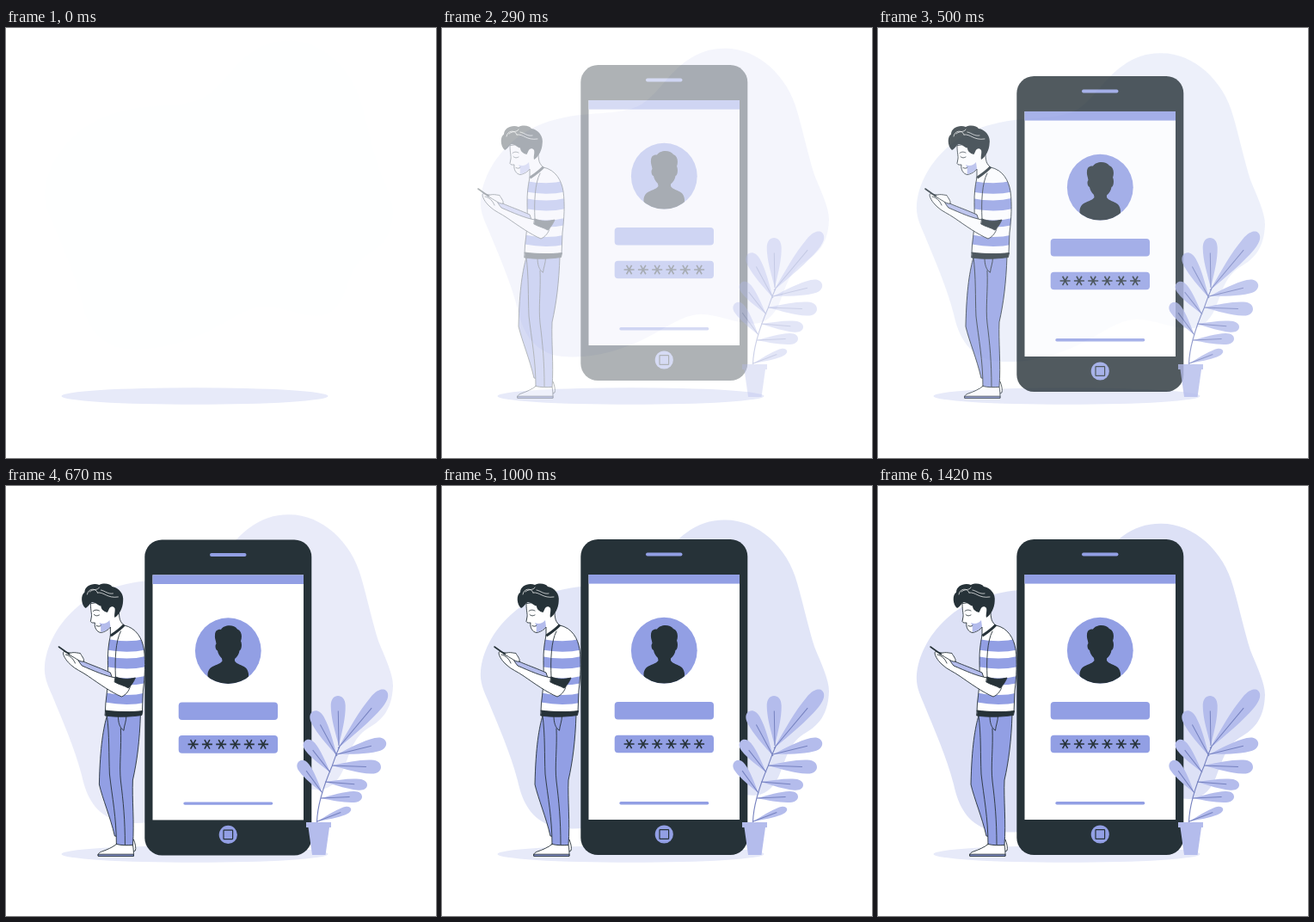
Animation, 500 px wide and 500 px high, one loop 1.54 s. Source, as an HTML page:

```html
<!DOCTYPE html>
<html lang="en">
<head>
<meta charset="utf-8">
<title>Mobile login</title>
<style>
html, body { margin: 0; width: 100%; height: 100%; overflow: hidden; background: #fff; }
svg { display: block; width: 100vw; height: 100vh; }
.dark { fill: #263238; }
.main { fill: #929fe4; }
.soft { fill: #b4bcec; }
.white { fill: #fff; }
.ink { stroke: #263238; stroke-width: .9; stroke-linejoin: round; stroke-linecap: round; }
.line { fill: none; }
</style>
</head>
<body>
<svg viewBox="0 0 500 500">
  <defs>
    <clipPath id="disc"><circle cx="258.3" cy="191.2" r="38.4"/></clipPath>
    <clipPath id="vest"><path id="vestShape" d="M121 174 C125 172 133 166 137 162 C151 165 158 177 160 190 C162 205 161 222 159 238 L158 263 L115 262 C115 250 118 238 118 225 C119 212 116 195 121 174Z"/></clipPath>
  </defs>

  <g id="blob">
    <path fill="#dde1f6" d="M328 43.8 C366 42.8 402 75 413 117 C421 145 426 169 433 191 C441 211 450 229 450 243 C449 274 434 285 420 293 C403 305 401 319 392 341 C385 357 374 364 362 364 C342 364 320 353 301 353 C272 354 252 379 205 394 C180 403 145 405 128 400 C104 391 94 374 88 347 C79 313 67 287 54 255 C48 241 44 233 45 219 C47 199 57 175 80 154 C102 134 128 126 155 122 C190 118 212 120 232 109 C252 96 262 74 285 58 C297 49 312 43.8 328 43.8Z"/>
  </g>

  <ellipse cx="219.5" cy="428" rx="155" ry="9.8" fill="#e7eaf9"/>

  <g id="phone">
    <rect class="dark" x="161.3" y="62" width="194" height="367" rx="20"/>
    <rect class="white" x="170.5" y="103" width="175.5" height="285"/>
    <rect class="main" x="170.5" y="103" width="175.5" height="10.6"/>
    <rect class="main" x="237" y="77.5" width="42.500" height="4" rx="2"/>
    <circle class="main" cx="258.3" cy="191.2" r="38.4"/>
    <path class="dark" clip-path="url(#disc)" d="M251.500 203 L251 200 C248 197 246.500 194 246 191 C243 190 243 184 244.500 183 C244 179 242.500 177 243 173 C243 168 246 166 250 166.500 C253 161 265 160 269 166 C274 168 275 174 273 180 C274.500 182 274.500 190 271.500 191 C271 195 269 198 266 200.500 L266 203 C270 209 281 207 282 218 L282 232 L234.500 232 L234.500 218 C236 207 247 209 251.500 203Z"/>
    <rect class="main" x="200.7" y="251" width="115.3" height="20.6" rx="4"/>
    <rect class="main" x="200.7" y="289.700" width="115.3" height="20.6" rx="4"/>
    <g id="stars" fill="none" stroke="#263238" stroke-width="1.6"></g>
    <rect class="main" x="206.3" y="367" width="104" height="3.4" rx="1.7"/>
    <circle class="main" cx="258.3" cy="405" r="10.6"/>
    <rect x="253" y="399.700" width="10.6" height="10.6" rx=".6" fill="none" stroke="#263238" stroke-width="1.200"/>
  </g>

  <g id="person" class="ink">
    <path class="white" d="M140 411 L148 411 C150 416 151 421 150 424 L140 428Z"/>
    <path class="main" d="M117 267 C113 281 109 302 108 347 C112 364 121 385 126 407 L139 409 L142 300Z"/>
    <path class="main" d="M117 267 C120 290 119 312 120 335 C123 362 128 385 128 418 L147 418 C149 390 146 365 147 342 C152 320 155 296 156 266Z"/>
    <path class="line" d="M130 267 C130 276 132 281 136 284 M139.500 267 C139.500 274 137 278 136.500 284 M133 282 C134 305 131 325 133 343 C136 367 138 388 138 417"/>
    <path class="white" d="M128 416.500 C134 418 141 418 147 417.500 C148 422 148 426 148 430.300 L107 430.300 C106 428 108 426 111 425 C117 423 124 420 128 416.500Z"/>
    <path class="main" d="M107 428.200 H148 V430.300 H107Z"/>

    <path class="white" d="M98 137 C98 145 99.500 149 99 152 L98 157.500 C99 159.500 101 159 103 159 C102 164 105 170 110 170.500 C114 170 119 167 121 164 L121 175 C127 173 133 168 137 162 C132 158 131 154 131 145 L118 134Z"/>
    <path class="soft" stroke="none" d="M108 159 C112 161 117 160 120 156 L121 163.500 C118 167 114 169.500 110 170 C109 168 111 164 108 159Z"/>
    <path class="line" d="M102 149.500 C104 151.500 106 151 108 150 M101 145.500 C103 143.500 106 144 108 145 M105 162.500 C107 163.500 109 163.500 110 162"/>
    <path class="dark" stroke="none" d="M92 142 C87 138 86 127 91 123.500 C91 116 101 112 108 115 C114 112 121 114 123 117 C131 118 137 126 135.700 134 C135.500 142 131 150 126 153 C125 150 127 145 126 142 C124 139 120 140 119 144 L117.500 147 C113 146 110 143 110 139.500 C106 139 104 135 100 135 C97 136 96 140 92 142Z"/>
    <path class="line" style="stroke:#fff;stroke-width:.7" d="M94 126 C95 119 104 118 106 124 M97 123 C101 119 106 122 108 118 M106 124 C114 123 117 131 130 129 M110 121 C115 122 118 126 124 125"/>

    <use href="#vestShape" class="white" stroke="none"/>
    <g id="stripes" clip-path="url(#vest)" class="line" style="stroke:#929fe4;stroke-linecap:butt"></g>
    <use href="#vestShape" class="line"/>
    <path class="line" style="stroke-width:3;stroke-linecap:butt" d="M121.500 174 C126 171 133 166 137 161.500"/>
    <path class="dark" d="M115.500 261 C130 263.500 146 263 158.500 261.500 L157.500 266.500 C144 268.500 128 269 115 267Z"/>

    <path class="soft" d="M80 198 C85 204 101 208 121 217 L124 226 C110 222 94 214 80 209Z"/>
    <path class="white" d="M127 223 C115 221 102 215 88 209 C85 206 82 199 78 195 L67 192.500 C64 194 69 203 75 208 C80 213 88 216 95 221 C108 230 122 240 134 245 C139 243 143 238 144 233Z"/>
    <path class="white" d="M72 195 C78 192.500 81 194 86 194.500 C87 197 91 201 90 204 C86 205 82 201 78 199Z"/>
    <path class="line" d="M69 196 C74 197 78 201 80 206 M133 169 C127 180 126 202 127 222"/>
    <path class="line" style="stroke-width:1.600" d="M61 187 L73 195.500"/>
    <path class="dark" d="M127 222 C135 225 142 225 150 223 C148 228 145 232 142 235 C137 232 131 231 126 228Z"/>
  </g>

  <g id="plant">
    <g id="leaves"></g>
    <path fill="none" stroke="#7581bf" stroke-width="1.100" d="M361.500 391 C362 370 370 347 379 326 C382 318 384 311 388 303"/>
    <path class="soft" d="M349 391 H378 V397 H376 L371.500 429 H356 L351.500 397 H349Z"/>
  </g>
</svg>
<script>
const $ = id => document.getElementById(id);
const clamp = v => Math.max(0, Math.min(1, v));

// base x, base y, tip x, tip y, width
const leaves = [
  [386, 305, 442, 238, 18], [387, 302, 386, 244, 17], [385, 314, 357, 262, 16],
  [377, 333, 348, 296, 14], [368, 357, 341, 320, 14], [385, 312, 442, 298, 16],
  [379, 325, 436, 327, 16], [371, 344, 420, 348, 13], [366, 363, 414, 361, 13],
  [362, 390, 401, 375, 9]
];

function leaf([x, y, tx, ty, w]) {
  const len = Math.hypot(tx - x, ty - y), h = w / 2;
  const turn = Math.atan2(ty - y, tx - x) * 180 / Math.PI;
  const a = len * .3, b = len * .55, c = len * .8;
  return `<g transform="translate(${x} ${y}) rotate(${turn})">
    <path class="soft" d="M0 0C${a} ${-h * .5} ${b} ${-h} ${c} ${-h}C${len * .94} ${-h} ${len} ${-h / 2} ${len} 0
      C${len} ${h / 2} ${len * .94} ${h} ${c} ${h}C${b} ${h} ${a} ${h * .5} 0 0"/>
    <path d="M0 0H${len * .7}" stroke="#7581bf"/></g>`;
}

// six arms, two of them level
function star(x, y, r) {
  const dx = r / 2, dy = r * .87;
  return `<path d="M${x - r} ${y}h${2 * r}M${x - dx} ${y - dy}l${2 * dx} ${2 * dy}M${x - dx} ${y + dy}l${2 * dx} ${-2 * dy}"/>`;
}

$('leaves').innerHTML = leaves.map(leaf).join('');
$('stars').innerHTML = [0, 1, 2, 3, 4, 5].map(i => star(217.6 + i * 16.3, 300, 6)).join('');
$('stripes').innerHTML = [[185, 12.5], [205, 12], [226, 8], [247, 11]]
  .map(([y, w]) => `<path stroke-width="${w}" d="M110 ${y - 2}Q142 ${y + 5} 166 ${y - 2}"/>`).join('');

// CSS-style cubic Bezier easing, solved by bisection
function bezier(x1, y1, x2, y2) {
  const at = (p, q, s) => 3 * (1 - s) * (1 - s) * s * p + 3 * (1 - s) * s * s * q + s * s * s;
  return x => {
    if (x <= 0) return 0;
    if (x >= 1) return 1;
    let lo = 0, hi = 1;
    for (let i = 0; i < 30; i++) {
      const mid = (lo + hi) / 2;
      if (at(x1, x2, mid) < x) lo = mid; else hi = mid;
    }
    return at(y1, y2, lo);
  };
}
const spring = bezier(.36, -.01, .5, 1.38);
const easeOut = bezier(0, 0, .58, 1);

const LOOP = 1540, STEP = 1000 / 24, SLIDE = -30;

function place(id, p, dx, dy) {
  const off = SLIDE * (1 - p);
  $(id).setAttribute('transform', `translate(${dx * off} ${dy * off})`);
  $(id).setAttribute('opacity', clamp(p));
}

function draw(ms) {
  // 24 pictures a second, with a short hold at both ends
  const step = Math.min(34, Math.floor((ms % LOOP) / STEP + .2));
  const t = step < 2 ? 25 : step * STEP + 30;
  const p = spring(t / 1000);
  place('blob', easeOut(t / 1500), 0, 1);
  place('phone', p, 0, 1);
  place('person', p, 1, 0);
  place('plant', p, 0, 0);
}

const start = performance.now();
function tick() {
  draw(performance.now() - start);
  requestAnimationFrame(tick);
}
tick();
</script>
</body>
</html>
```
